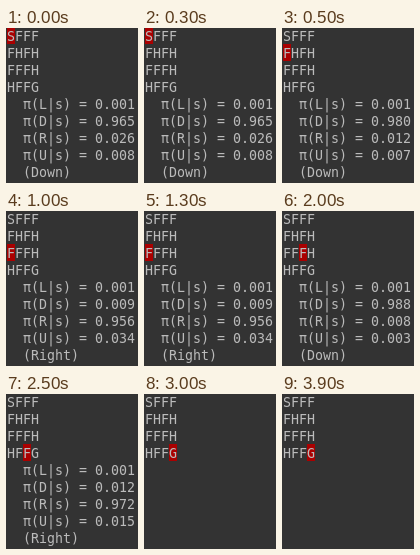
Animation of 132 by 155 pixels, one loop 4.5 s. Source, as an HTML page:

```html
<!DOCTYPE html>
<html lang="en">
<head>
<meta charset="utf-8">
<title>Grid walk policy</title>
<style>
  html, body { margin: 0; width: 100%; height: 100%; overflow: hidden; background: #333; }
  #cursor { position: absolute; width: 8px; height: 17px; background: #a00; }
  #screen {
    position: absolute; left: 1px; top: 0; margin: 0;
    font: 13.29px/17px "DejaVu Sans Mono", monospace;
    color: #bbb; white-space: pre;
  }
</style>
</head>
<body>
<div id="cursor"></div>
<pre id="screen"></pre>
<script>
const STEP = 500, LOOP = 4500;
const CELL_W = 8, CELL_H = 17;
const GRID = ["SFFF", "FHFH", "FFFH", "HFFG"];

// row, column, probabilities for L D R U, chosen action
const STEPS = [
  [0, 0, ["0.001", "0.965", "0.026", "0.008"], "Down"],
  [1, 0, ["0.001", "0.980", "0.012", "0.007"], "Down"],
  [2, 0, ["0.001", "0.009", "0.956", "0.034"], "Right"],
  [2, 1, ["0.001", "0.011", "0.985", "0.003"], "Right"],
  [2, 2, ["0.001", "0.988", "0.008", "0.003"], "Down"],
  [3, 2, ["0.001", "0.012", "0.972", "0.015"], "Right"],
  [3, 3]
];

const cursor = document.getElementById("cursor");
const screenText = document.getElementById("screen");
let shown = -1;

function show(index) {
  const [row, col, probs, action] = STEPS[index];
  const lines = [...GRID];
  if (probs) {
    probs.forEach((p, i) => lines.push(`  π(${"LDRU"[i]}|s) = ${p}`));
    lines.push(`  (${action})`);
  }
  screenText.textContent = lines.join("\n");
  cursor.style.left = 1 + col * CELL_W + "px";
  cursor.style.top = row * CELL_H - 1 + "px";
}

function tick() {
  const t = performance.now() % LOOP;
  const index = Math.min(Math.floor(t / STEP), STEPS.length - 1);
  if (index !== shown) show(shown = index);
  requestAnimationFrame(tick);
}
tick();
</script>
</body>
</html>
```
